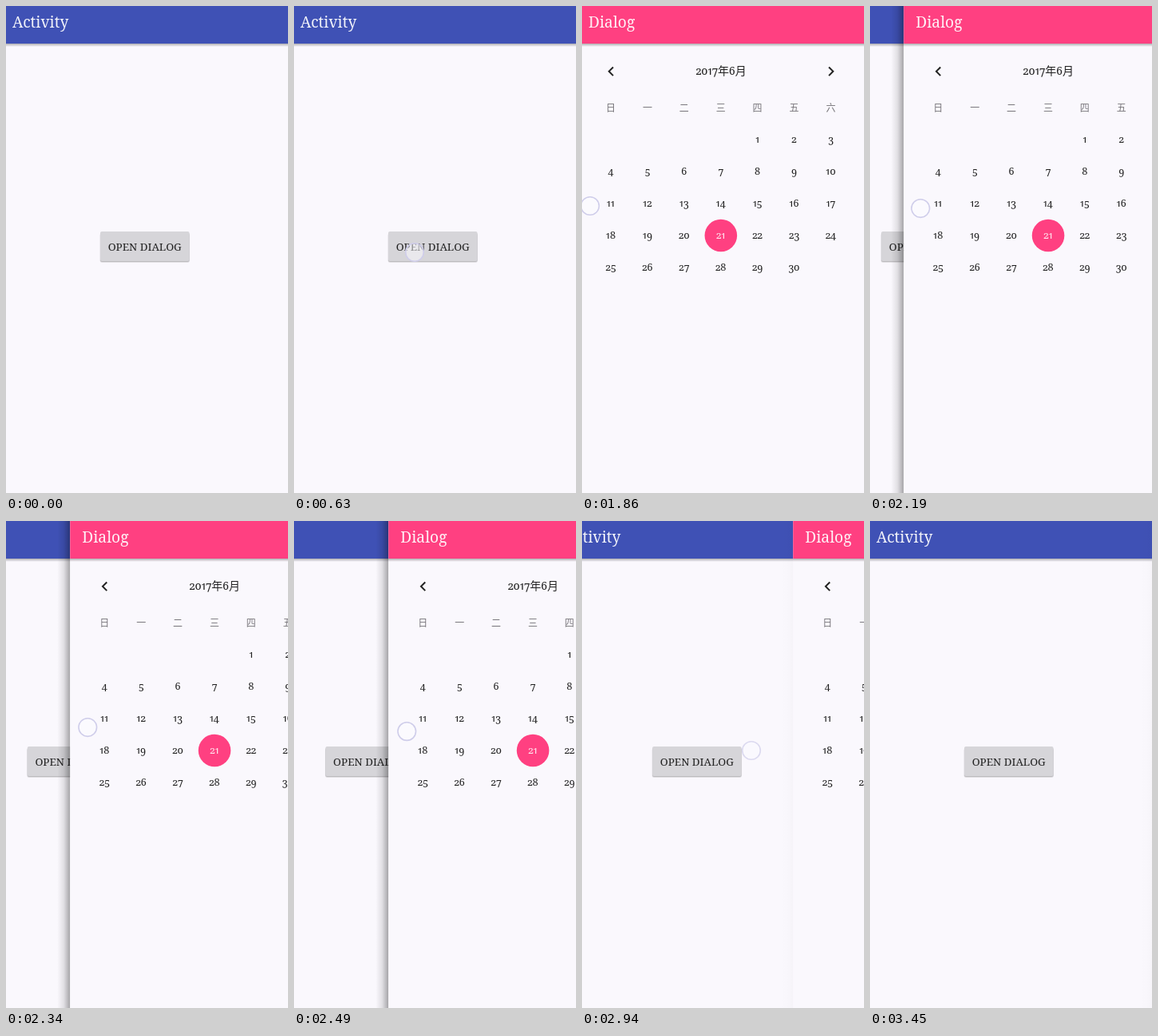
Animation, 353 px wide and 609 px high, one loop 3.57 s. Source, as an HTML page:

```html
<!DOCTYPE html>
<html lang="zh">
<head>
<meta charset="utf-8">
<style>
html, body { margin: 0; width: 100%; height: 100%; overflow: hidden; background: #faf8fd; }
svg { display: block; width: 353px; height: 609px; }
text { font-family: "Noto Serif", "Noto Sans CJK SC", "Noto Sans CJK", serif; font-variant-numeric: oldstyle-nums proportional-nums; fill: #222; }
.title { font-size: 19.2px; fill: #fff; fill-opacity: .93; }
.mid { text-anchor: middle; }
.week { font: 12px "Noto Sans CJK SC", "Noto Sans CJK", sans-serif; fill: #77757a; }
</style>
</head>
<body>
<svg viewBox="0 0 353 609">
  <defs>
    <linearGradient id="drop" x2="0" y2="1">
      <stop stop-opacity=".3"/><stop offset="1" stop-opacity="0"/>
    </linearGradient>
    <linearGradient id="side">
      <stop stop-opacity="0"/><stop offset=".5" stop-opacity=".1"/><stop offset="1" stop-opacity=".34"/>
    </linearGradient>
    <path id="chevron" d="M3.7 -4.6L2.3 -6L-3.7 0L2.3 6L3.7 4.6L-.9 0z" fill="#222"/>
  </defs>

  <g id="activity">
    <rect x="-7" width="361" height="609" fill="#faf8fd"/>
    <rect x="-7" y="47" width="361" height="4" fill="url(#drop)"/>
    <rect x="-7" width="361" height="47" fill="#3f51b5"/>
    <text class="title" x="8" y="27">Activity</text>
    <rect x="117.5" y="284" width="112.5" height="37" rx="3" opacity=".1"/>
    <rect x="118" y="283" width="111.5" height="37" rx="2" opacity=".16"/>
    <rect x="118" y="282" width="111.5" height="37" rx="2" fill="#d6d5d9"/>
    <text class="mid" x="173.7" y="305.5" font-size="13.4">OPEN DIALOG</text>
  </g>

  <g id="dialog">
    <rect id="edge" x="-23" width="16" height="609" fill="url(#side)"/>
    <rect x="-7" width="361" height="609" fill="#faf8fd"/>
    <rect x="-7" y="47" width="361" height="4" fill="url(#drop)"/>
    <rect x="-7" width="361" height="47" fill="#ff4081"/>
    <text class="title" x="8" y="27">Dialog</text>
    <use href="#chevron" x="36" y="81.8"/>
    <use href="#chevron" transform="translate(312 81.8) scale(-1 1)"/>
    <text class="mid" x="174" y="86" font-size="14">2017年6月</text>
    <circle cx="173.8" cy="287" r="20.3" fill="#ff4081"/>
    <g id="days"></g>
  </g>

  <circle id="touch" r="11.3" fill="#fcfbff" fill-opacity=".5" stroke-width="1.6"/>
</svg>
<script>
const LOOP = 3570, WIDTH = 361;
const $ = id => document.getElementById(id);
const [activity, dialog, edge, touch] = ['activity', 'dialog', 'edge', 'touch'].map($);

// Calendar: the month starts in column 4
const colX = c => 36 + 45.9 * c;
const label = (c, y, s, attrs) => `<text x="${colX(c)}" y="${y}" ${attrs}>${s}</text>`;
let cells = [...'日一二三四五六'].map((s, c) => label(c, 132, s, 'class="mid week"')).join('');
for (let d = 1; d <= 30; d++) {
  const i = d + 3;
  const tint = d === 21 ? 'style="fill:#ffe6ef"' : '';
  cells += label(i % 7, 170.5 + 40.2 * Math.floor(i / 7), d, `class="mid" font-size="12.8" ${tint}`);
}
$('days').innerHTML = cells;

// Drag: time, finger x, finger y, dialog shift
const drag = [
  [1860, 10, 250, 0], [1980, 18, 250, 4], [2190, 63, 253, 49], [2490, 141, 263, 125],
  [2670, 188, 278, 175], [2790, 208, 285, 195], [2878, 212, 287, 198]
];
const START = drag[0][0], RELEASE = drag.at(-1)[0];
const ramp = (t, from, to) => Math.min(1, Math.max(0, (t - from) / (to - from)));
const easeOut = (p, n) => 1 - (1 - p) ** n;

function dragAt(t) {
  const n = Math.max(1, drag.findIndex(k => k[0] >= t));
  const a = drag[n - 1], b = drag[n], p = ramp(t, a[0], b[0]);
  return a.map((v, i) => v + (b[i] - v) * p);
}

function shiftAt(t) {
  if (t < START) return WIDTH * (1 - easeOut(ramp(t, 720, 1050), 2));
  if (t < RELEASE) return dragAt(t)[3];
  return 198 + (WIDTH - 198) * easeOut(ramp(t, RELEASE, RELEASE + 560), 5);
}

function placeTouch(x, y, opacity, stroke) {
  touch.setAttribute('cx', x);
  touch.setAttribute('cy', y);
  touch.setAttribute('opacity', opacity);
  touch.setAttribute('stroke', stroke);
}

function draw(t) {
  const shift = shiftAt(t);
  dialog.setAttribute('transform', `translate(${shift} 0)`);
  activity.setAttribute('transform', `translate(${(shift - WIDTH) / 3} 0)`);
  edge.setAttribute('opacity', t < START ? 0 : 1 - .95 * ramp(t, RELEASE, 2935));

  if (t < 570) placeTouch(151, 308, 0, 'none');
  else if (t < START) placeTouch(151, 308, 1 - .2 * ramp(t, 690, 840), t < 750 ? '#cfcdea' : '#ebe6ef');
  else {
    const [, x, y] = dragAt(Math.min(t, RELEASE));
    placeTouch(x, y, 1 - ramp(t, RELEASE, 3090), '#cfcdea');
  }
}

function tick() {
  draw(performance.now() % LOOP);
  requestAnimationFrame(tick);
}
tick();
</script>
</body>
</html>
```
